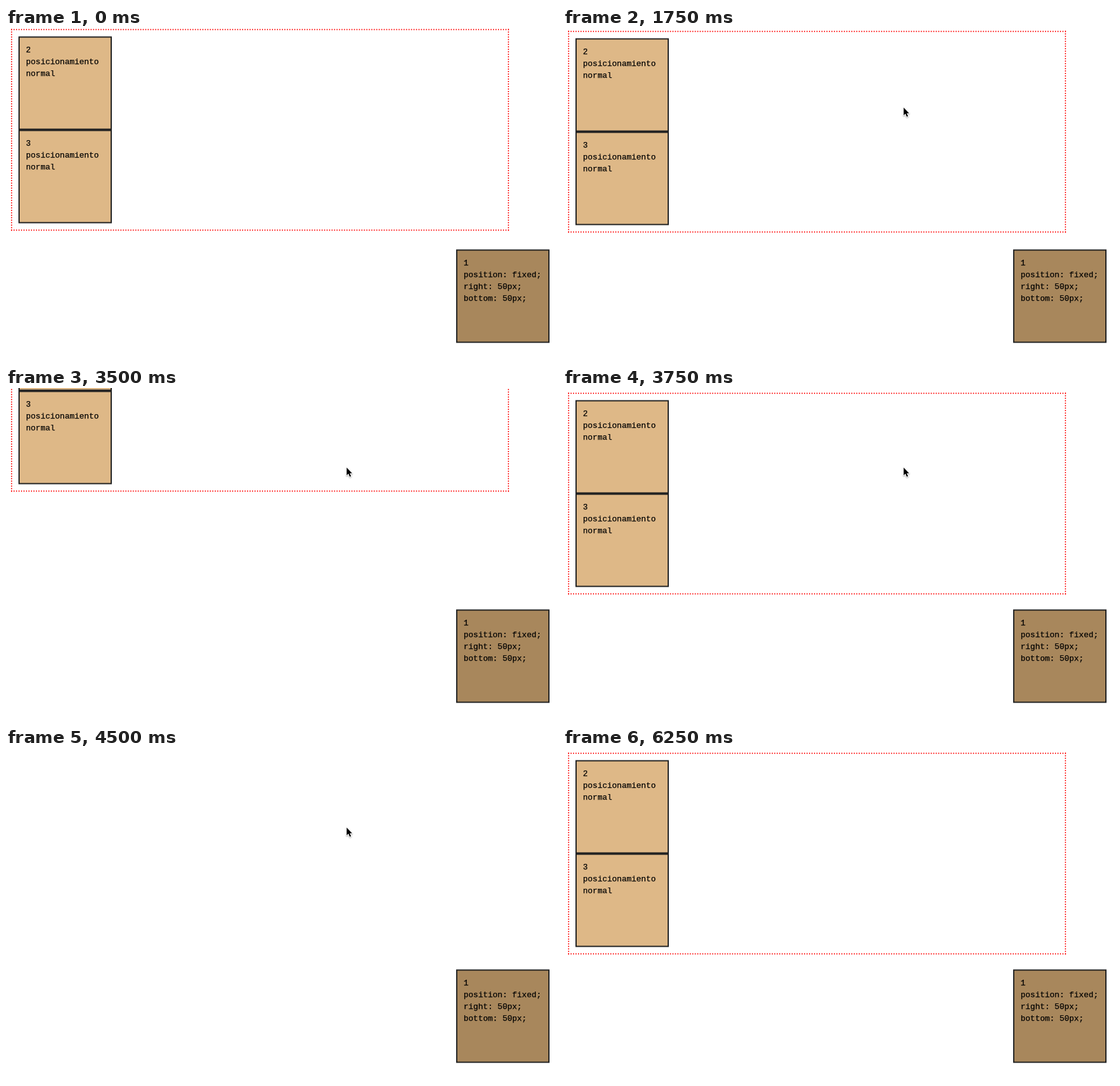
An HTML page with a canvas that plays this animation: 885 px wide and 533 px high, repeating every 6.75 s.

```html
<!DOCTYPE html>
<html lang="es">
<head>
<meta charset="utf-8">
<title>position: fixed</title>
<style>
html, body { margin: 0; width: 100%; height: 100%; overflow: hidden; background: #fff; }
canvas { display: block; }
</style>
</head>
<body>
<canvas id="stage" width="885" height="533"></canvas>
<script>
const ctx = document.getElementById('stage').getContext('2d');
const LOOP = 6750;
const STEP = 250;
const REST = 7.5;
const SIZE = 150;
const BORDER = 2;
const LINE = 19.2;
const arrow = new Path2D('M0 0V12.5L2.8 9.8 4.9 14.7 7 13.8 4.9 9.1H8.7Z');

// The page leaves with growing speed and returns with falling speed.
function swipe(k, leave, push, back, tail) {
  if (k < leave || k > back) return 0;
  return Math.min(push * 54 ** (k - leave), tail * 54 ** (back - k));
}

function scrollTop(k) {
  const nudge = k < 2 ? 6 : 0;
  return nudge + swipe(k, 7, 3, 14, 165) + swipe(k, 17, 144, 22, 400);
}

function box(x, y, fill, lines) {
  ctx.fillStyle = fill;
  ctx.fillRect(x + BORDER, y + BORDER, SIZE - 2 * BORDER, SIZE - 2 * BORDER);
  ctx.fillStyle = ctx.strokeStyle = '#000';
  ctx.lineWidth = 0.25;
  ctx.font = '13px "Liberation Mono", Courier, monospace';
  lines.forEach((line, i) => {
    const baseline = Math.round(y + 25.2 + i * LINE);
    ctx.fillText(line, x + 12, baseline);
    ctx.strokeText(line, x + 12, baseline);
  });
}

function frame(x, y, w, h) {
  ctx.fillStyle = '#222';
  ctx.fillRect(x, y, w, h);
}

// Round dots, spaced so that one sits on each end.
function dottedLine(x1, y1, x2, y2) {
  const length = Math.hypot(x2 - x1, y2 - y1);
  const count = Math.round(length / (2 * BORDER));
  ctx.fillStyle = '#f00';
  ctx.beginPath();
  for (let i = 0; i <= count; i++) {
    const x = x1 + (x2 - x1) * i / count;
    const y = y1 + (y2 - y1) * i / count;
    ctx.moveTo(x + 1, y);
    ctx.arc(x, y, BORDER / 2, 0, 2 * Math.PI);
  }
  ctx.fill();
}

function container(y) {
  const left = 9, right = 807, top = y + 1, bottom = y + 323;
  dottedLine(left, top, right, top);
  dottedLine(left, bottom, right, bottom);
  dottedLine(left, top, left, bottom);
  dottedLine(right, top, right, bottom);
  frame(20, y + 12, SIZE, 2 * SIZE);
  for (const n of [2, 3]) {
    box(20, y + 12 + (n - 2) * SIZE, '#deb887', [n, 'posicionamiento', 'normal']);
  }
}

function pointer(x, y) {
  ctx.save();
  ctx.translate(x, y);
  ctx.lineJoin = 'round';
  ctx.strokeStyle = '#fff';
  ctx.lineWidth = 2;
  ctx.shadowColor = 'rgba(0,0,0,0.35)';
  ctx.shadowBlur = 2;
  ctx.shadowOffsetY = 1;
  ctx.stroke(arrow);
  ctx.shadowColor = 'transparent';
  ctx.fillStyle = '#000';
  ctx.fill(arrow);
  ctx.restore();
}

function draw(t) {
  const k = Math.floor(t / STEP);
  ctx.fillStyle = '#fff';
  ctx.fillRect(0, 0, 885, 533);
  container(REST - scrollTop(k));
  frame(723, 355.5, SIZE, SIZE);
  box(723, 355.5, '#a8875c', ['1', 'position: fixed;', 'right: 50px;', 'bottom: 50px;']);
  if (k >= 1 && k < 24) pointer(547.2, 127.8);
  if (k === 24) pointer(544.2, 114.8);
}

const start = performance.now();
function tick() {
  draw((performance.now() - start) % LOOP);
  requestAnimationFrame(tick);
}
tick();
</script>
</body>
</html>
```
